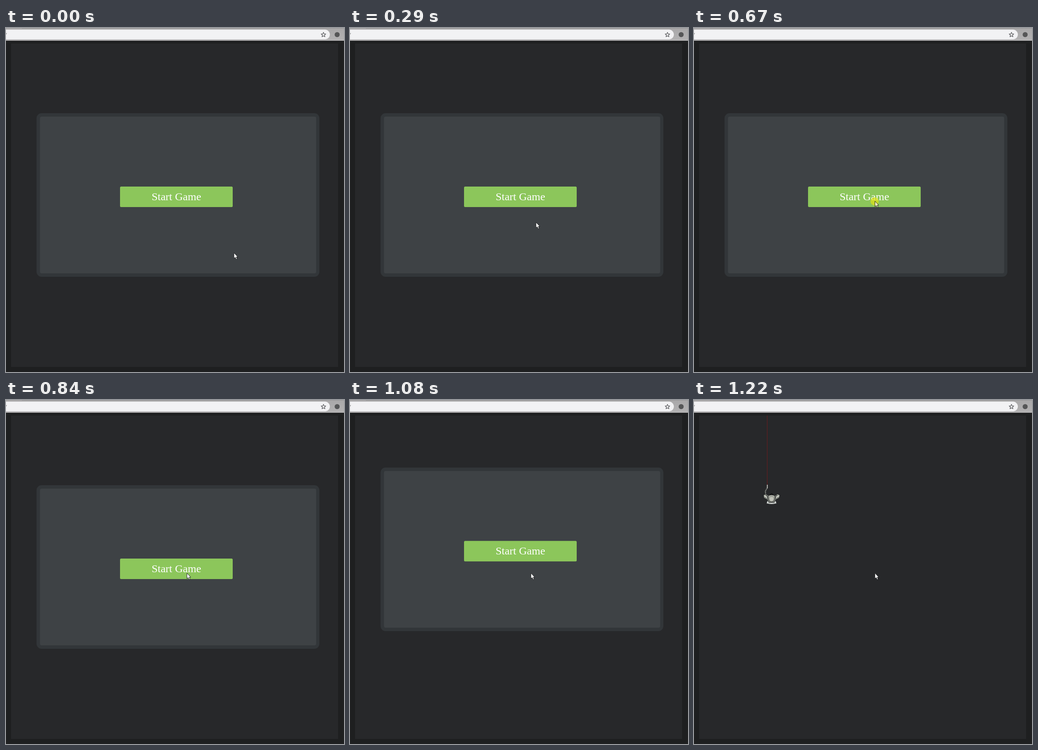
Recreate the animation shown at these times as an HTML page. Size 741 px wide and 755 px high, loop 1.6 s.

```html
<!DOCTYPE html>
<html lang="en">
<head>
<meta charset="utf-8">
<title>Start Game</title>
<style>
  html, body { margin: 0; width: 100%; height: 100%; overflow: hidden; background: #1e1f20; }
  svg { display: block; width: 741px; height: 755px; }
  text { font: 24px "Liberation Serif", "Times New Roman", serif; }
</style>
</head>
<body>
<svg viewBox="0 0 741 755">
  <defs>
    <clipPath id="arena"><rect x="11" y="34" width="717" height="710"/></clipPath>
    <linearGradient id="bar" x2="0" y2="1">
      <stop offset="0" stop-color="#a9a8a9"/>
      <stop offset="1" stop-color="#b3b2b3"/>
    </linearGradient>
  </defs>

  <rect width="741" height="755" fill="#1e1f20"/>
  <rect x="11" y="34" width="717" height="710" fill="#27282a"/>

  <!-- browser bar -->
  <rect width="741" height="28" fill="url(#bar)"/>
  <path d="M35 .5H741" stroke="#969596"/>
  <rect x="-20" y="3.5" width="730" height="21.5" rx="10.75" fill="#f2f2f4"/>
  <path d="M0 14L1.5 11" stroke="#777"/>
  <path id="star" fill="none" stroke="#4c4d50" stroke-width="1.1" stroke-linejoin="round"/>
  <circle cx="726" cy="14.5" r="5.5" fill="#555657"/>

  <g clip-path="url(#arena)">
    <g id="panel">
      <rect x="67" y="187" width="620" height="359" rx="11" fill="#323639"/>
      <rect x="74.5" y="194.5" width="605.5" height="344" rx="4" fill="#3e4245"/>
      <rect x="250" y="348" width="247" height="45" rx="2.5" fill="#8cc65b"/>
      <text x="373.5" y="378" text-anchor="middle" fill="#fff">Start Game</text>
    </g>

    <!-- player seen from above -->
    <g id="player">
      <path d="M160.5 34V187" stroke="#6c1b1e"/>
      <path d="M157 208L156 200L160 193" fill="none" stroke="#6f726f" stroke-width="3"/>
      <path d="M155 206V199L160 192" fill="none" stroke="#1a1b1b"/>
      <path d="M160.7 186V194" stroke="#d8d9d2" stroke-width="1.6"/>
      <path d="M161 221H179L181 227Q170 230 159 227Z" fill="#dfe3e0" stroke="#35393a" stroke-width=".7"/>
      <path d="M152 208L158 206L164 210H177L183 206L188 208L187 215L179 219L176 225H164L161 219L153 215Z" fill="#858982" stroke="#161718"/>
      <path d="M154 210L161 214M187 210L179 214" stroke="#d3d5cb" stroke-width="2.4"/>
      <path d="M159 208L163 218M181 208L177 218" stroke="#303332" stroke-width="1.2"/>
      <ellipse cx="170" cy="214.5" rx="7.5" ry="9.5" fill="#a7aaa1" stroke="#222423"/>
      <path d="M163.5 210Q170 200 176.5 210Q170 207 163.5 210Z" fill="#111214"/>
      <path d="M165 214Q170 210 175 214L174 221Q170 224 166 221Z" fill="#c1c3b9" stroke="#73766f" stroke-width=".7"/>
    </g>
  </g>

  <circle id="press" cx="396" cy="380.5" r="9" fill="#e0e214" opacity=".7"/>
  <path id="cursor" d="M0 0V12L2.8 9.7L4.8 14.2L6.9 13.3L5 9H8.4Z" fill="#fff" stroke="#151617" stroke-width=".9"/>
</svg>
<script>
const LOOP = 1600;
const APPROACH = [70, 140, 220, 290];
const NUDGE = [440, 520, 600];
const PRESS = 670, RELEASE = 840, PLAY = 1220;
const SLIDE = [920, 1000, 1080, 1140];
const SLIDE_PHASE = [0.19, 0.44, 0.69, 0.924];
const TRAVEL = 500;

const el = id => document.getElementById(id);
const mix = (a, b, p) => a + (b - a) * p;
const easeOut = p => 1 - Math.pow(1 - p, 1.6);
const easeInBack = p => p * p * (2.70158 * p - 1.70158);
const stepsDone = (times, t) => times.filter(s => t >= s).length;
const show = (id, on) => el(id).setAttribute("visibility", on ? "visible" : "hidden");
const move = (id, x, y) => el(id).setAttribute("transform", `translate(${x} ${y})`);

const starPoint = (_, i) => {
  const angle = (i / 5 - 0.5) * Math.PI, r = i % 2 ? 2.4 : 5.4;
  return `${696 + r * Math.cos(angle)} ${14.8 + r * Math.sin(angle)}`;
};
el("star").setAttribute("d", "M" + Array.from({ length: 10 }, starPoint).join("L") + "Z");

function render(t) {
  const first = easeOut(stepsDone(APPROACH, t) / APPROACH.length);
  const second = easeOut(stepsDone(NUDGE, t) / NUDGE.length);
  move("cursor",
    mix(mix(499.8, 407.8, first), 396.7, second),
    mix(mix(493.5, 426.5, first), 380, second));

  const slid = stepsDone(SLIDE, t);
  const phase = slid ? SLIDE_PHASE[slid - 1] : 0;
  move("panel", 0, -TRAVEL * easeInBack(phase));

  show("panel", t < PLAY);
  show("player", t >= PLAY);
  show("press", t >= PRESS && t < RELEASE);
  el("cursor").setAttribute("fill", t >= PRESS && t < RELEASE ? "#fafbc0" : "#fff");
}

const start = performance.now();
function tick() {
  render((performance.now() - start) % LOOP);
  requestAnimationFrame(tick);
}
tick();
</script>
</body>
</html>
```
